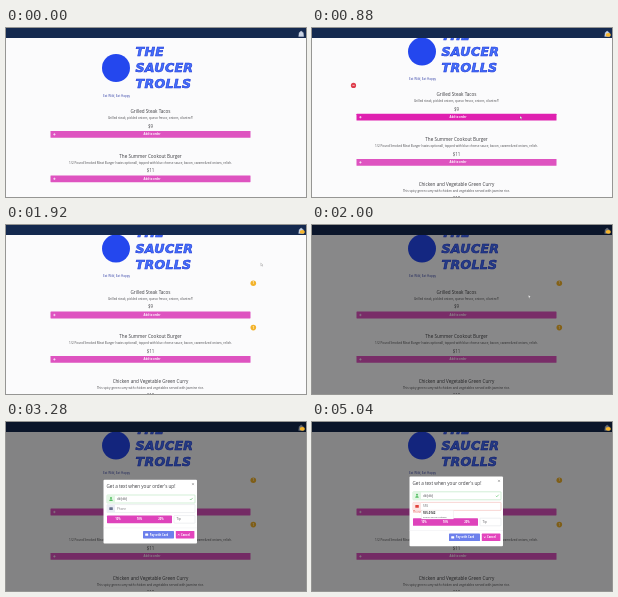
An HTML page for the animation above (5120 ms loop, 300 by 169 pixels).

```html
<!DOCTYPE html>
<html lang="en">
<head>
<meta charset="utf-8">
<title>Order page</title>
<style>
html, body { margin: 0; width: 100%; height: 100%; overflow: hidden; background: #fbfbfc; }
svg { display: block; width: 100vw; height: 100vh; }
text { font-family: "Open Sans", "Noto Sans", sans-serif; font-size: 3.05px; fill: #4a4a4e; }
.mid { text-anchor: middle; }
.title { font-size: 4.6px; fill: #3c3c40; }
.price { font-size: 4.4px; }
.label { font-size: 2.7px; font-weight: 700; fill: #fff; }
.word { font-family: "DejaVu Sans", sans-serif; font-size: 12.6px; font-weight: 700; font-style: italic;
  letter-spacing: .3px; fill: #4470fb; stroke: #1c34d6; stroke-width: .6px; }
.field { fill: #fff; stroke-width: .4px; }
.in { font-size: 3px; fill: #55555a; }
</style>
</head>
<body>
<svg viewBox="0 0 300 169" preserveAspectRatio="none">
  <rect width="300" height="169" fill="#fbfbfc"/>
  <g id="page">
    <circle cx="110" cy="40" r="14" fill="#2447ee"/>
    <text class="word" x="129.5" y="28">THE</text>
    <text class="word" x="129.5" y="44.3">SAUCER</text>
    <text class="word" x="129.5" y="60">TROLLS</text>
    <text x="97" y="68.6" style="font-size:3px;fill:#3442a8">Eat Wild, Eat Happy</text>
    <g id="menu"></g>
  </g>
  <rect width="300" height="10" fill="#14294f"/>
  <path d="M293.2 4.6h4l.5 3.8h-5zM294 4.6a1.2 1.4 0 0 1 2.4 0" fill="#c9d2e4" stroke="#c9d2e4" stroke-width=".4"/>
  <rect id="dim" width="300" height="169"/>
  <ellipse id="cart" cx="296.3" cy="6.9" rx="2.6" ry="1.8" fill="#f6b52c"/>
  <g id="modal">
    <rect id="sheet" x="97.5" width="93.5" rx="1" fill="#fff"/>
    <text class="title" x="100.5" y="8.4">Get a text when your order's up!</text>
    <path d="M186 3.3l2 2m0-2l-2 2" stroke="#777" stroke-width=".5"/>
    <g transform="translate(0 15.2)">
      <rect id="nameBox" class="field" x="101" y="0" width="88" height="8" rx=".6"/>
      <rect id="nameSide" x="101.2" y=".2" width="7.8" height="7.6"/>
      <g id="nameIcon"><circle cx="105" cy="3" r="1"/><path d="M103.2 6a1.8 1.8 0 0 1 3.6 0z"/></g>
      <text id="name" class="in" x="111" y="5.1"></text>
      <path id="check" d="M183.8 4l1 1 1.9-2.1" fill="none" stroke="#54bf62" stroke-width=".6"/>
      <rect id="nameCaret" y="2" width=".3" height="4" fill="#333"/>
    </g>
    <g id="phoneRow">
      <rect id="phoneBox" class="field" x="101" y="0" width="88" height="8" rx=".6"/>
      <rect id="phoneSide" x="101.2" y=".2" width="7.8" height="7.6"/>
      <rect id="phoneIcon" x="103.3" y="2.7" width="3.5" height="2.7" rx=".5"/>
      <rect id="mark" y="1.8" height="4.4" fill="#a9c8f7"/>
      <text id="phone" class="in" x="111" y="5.1"></text>
      <rect id="phoneCaret" y="2" width=".3" height="4" fill="#333"/>
      <text id="error" x="101" y="10.9" style="font-size:2.7px;fill:#e2433c">Phone number is not valid</text>
    </g>
    <g id="foot">
      <rect x="101" y="0" width="65" height="7.6" rx=".6" fill="#de43bb"/>
      <text class="label mid" x="112" y="4.8">10%</text>
      <text class="label mid" x="133.5" y="4.8">18%</text>
      <text class="label mid" x="155" y="4.8">20%</text>
      <rect class="field" x="168" y="0" width="21" height="7.6" rx=".6" stroke="#d5d8df"/>
      <text class="in" x="170.5" y="4.9">Tip</text>
      <path d="M97.5 12.3h93.5" stroke="#e8e8ee" stroke-width=".4"/>
      <rect x="137" y="15.4" width="31" height="7.4" rx=".6" fill="#6d80ec"/>
      <rect x="139.2" y="18" width="3" height="2.2" rx=".3" fill="#fff"/>
      <text class="label" x="143.8" y="20.1">Pay with Card</text>
      <rect x="169.8" y="15.4" width="18.6" height="7.4" rx=".6" fill="#e344bd"/>
      <path d="M172 18.3l1.5 1.5m0-1.5l-1.5 1.5" stroke="#fff" stroke-width=".5"/>
      <text class="label" x="175" y="20.1">Cancel</text>
    </g>
    <g id="wordList">
      <rect x="109.5" y="33" width="76.5" height="6.8" fill="#add0f4"/>
      <text class="in" x="111" y="37.3" style="fill:#26344a">dkfjdkfjdkfj</text>
    </g>
    <g id="numberList">
      <rect x="109.5" y="33.6" width="32" height="8.8" fill="#fff" stroke="#ddd" stroke-width=".3"/>
      <text x="111" y="37.3" style="font-size:2.85px;font-weight:700;fill:#333">555-0142</text>
      <text x="111" y="41.3" style="font-size:2.3px">Phone and fill settings</text>
    </g>
  </g>
  <path id="cursor" d="M0 0v2.8l.7-.6.6 1.2.5-.3-.5-1.1h.9z" fill="#fff" stroke="#666" stroke-width=".25"/>
</svg>
<script>
const LOOP = 5120, STEP = 80;
const NAME = "dkfjdkfj";
const $ = id => document.getElementById(id);
const set = (id, attrs) => {
  for (const k in attrs) $(id).setAttribute(k, attrs[k]);
};
const show = (id, on) => set(id, { visibility: on ? "inherit" : "hidden" });
const move = (id, x, y) => set(id, { transform: `translate(${x} ${y})` });

// Tables of [time, value]: hold keeps the last value, glide eases between them.
function hold(table, t) {
  let value = table[0][1];
  for (const [at, v] of table) if (t >= at) value = v;
  return value;
}
function glide(table, t) {
  const i = table.findIndex(row => row[0] > t);
  if (i === 0) return table[0].slice(1);
  if (i < 0) return table[table.length - 1].slice(1);
  const a = table[i - 1], b = table[i];
  const p = (t - a[0]) / (b[0] - a[0]), e = p * p * (3 - 2 * p);
  return a.slice(1).map((v, k) => v + (b[k + 1] - v) * e);
}

const dishes = [
  ["Grilled Steak Tacos", "Grilled steak, pickled onions, queso fresco, onions, cilantro!!!", "$9"],
  ["The Summer Cookout Burger", "1/2 Pound Smoked Meat Burger (swiss optional), topped with blue cheese sauce, bacon, caramelized onions, relish.", "$11"],
  ["Chicken and Vegetable Green Curry", "This spicy green curry with chicken and vegetables served with jasmine rice.", "$10"]
];
$("menu").innerHTML = dishes.map(([title, about, price], i) => `
  <g id="dish${i}">
    <text class="title mid" x="144.5" y="1.7">${title}</text>
    <text class="mid" x="144.5" y="7.7">${about}</text>
    <text class="price mid" x="144.5" y="16.2">${price}</text>
    <rect id="add${i}" x="44.5" y="19.4" width="200" height="6.8" rx=".4"/>
    <path d="M47.2 22.8h2.4m-1.2-1.2v2.4" stroke="#fff" stroke-width=".6"/>
    <text class="label mid" x="146" y="23.8">Add to order</text>
    <g id="less${i}"><circle cx="41.5" cy="-9" r="2.6" fill="#de3d4c"/>
      <path d="M40.4 -9h2.2" stroke="#fff" stroke-width=".6"/></g>
    <g id="count${i}"><circle cx="247.3" cy="-9" r="2.8" fill="#f3b32b"/>
      <text class="label mid" x="247.3" y="-8">1</text></g>
  </g>`).join("");

const scroll = [[0, 0], [560, 0], [720, -16.4]];
const hovered = [[0, -1], [720, 0], [1040, -1], [1120, 1], [1440, -1]];
const lifts = [
  [[0, 0], [720, 0], [1040, -1.6], [1200, 0]],
  [[0, 0], [1040, 0], [1200, -1.6], [1360, -1.6], [1520, 0]],
  [[0, 0]]
];
const added = [960, 1280, Infinity];
const pointer = [
  [80, 200, 78], [240, 207, 91], [640, 207, 91], [720, 208, 88], [960, 208, 88],
  [1120, 217, 133], [1280, 217, 133], [1360, 216.5, 92.5], [1680, 293, 6],
  [1840, 293, 6], [2000, 216.5, 70], [2320, 130, 76]
];
const nameLength = [[0, 0], [2800, 1], [3040, 4], [3200, 6], [3280, 8]];
const phoneText = [
  [0, ""], [3520, "d"], [3600, "dk"], [3680, "dkfj"], [3760, "dkfjd"], [3920, "dkfjdk"],
  [4000, "dkfjdkf"], [4080, NAME], [4480, ""], [4640, "5"], [4720, "55"], [4800, "555"]
];

function drawPage(t) {
  move("page", 0, glide(scroll, t)[0]);
  const over = hold(hovered, t);
  dishes.forEach((_, i) => {
    move("dish" + i, 0, 83.6 + i * 44.4 + glide(lifts[i], t)[0]);
    set("add" + i, { fill: over === i ? "#df20b0" : "#de53c0" });
    show("less" + i, over === i && t >= added[i] - 80);
    show("count" + i, t >= added[i]);
  });
  show("cart", t >= 880);
  set("dim", { opacity: hold([[0, 0], [2000, .46], [2080, .48]], t) });
}

function drawModal(t) {
  const open = t >= 2080;
  show("modal", open);
  if (!open) return;
  const bad = t >= 3520, grow = bad ? 5.8 : 0;
  const [slide, fade] = glide([[2000, -26, 0], [2320, 0, 1]], t);
  move("modal", 0, (bad ? 54.6 : 57.8) + slide);
  set("modal", { opacity: fade });
  set("sheet", { height: 63.8 + grow });
  move("phoneRow", 0, bad ? 25.8 : 24.8);
  move("foot", 0, 35.8 + grow);

  const good = t >= 2800;
  set("nameBox", { stroke: good ? "#8fd79a" : "#d5d8df" });
  set("nameSide", { fill: good ? "#e2f6e4" : "#eceef3" });
  set("nameIcon", { fill: good ? "#54bf62" : "#76809a" });
  show("check", good);
  const typed = NAME.slice(0, hold(nameLength, t));
  $("name").textContent = typed || "Name";
  set("name", { opacity: typed ? 1 : .6 });
  set("nameCaret", { x: 111.2 + (typed ? $("name").getComputedTextLength() : 0) });
  show("nameCaret", t >= 2800 && t < 3280);

  set("phoneBox", { stroke: bad ? "#ee9a96" : "#d5d8df" });
  set("phoneSide", { fill: bad ? "#fde5e4" : "#e9ecf4" });
  set("phoneIcon", { fill: bad ? "#e2433c" : "#67718f" });
  show("error", bad);
  const number = hold(phoneText, t);
  const picks = t >= 4080 && t < 4480;
  const label = $("phone");
  label.textContent = number || "Phone";
  set("phone", { opacity: number ? 1 : .75 });
  const end = 111 + (number ? label.getComputedTextLength() : 0);
  if (picks) {
    label.textContent = number + "dkfj";
    set("mark", { x: end, width: 111 + label.getComputedTextLength() - end });
  }
  show("mark", picks);
  set("phoneCaret", { x: end + .2 });
  show("phoneCaret", bad && !picks && t < 5040);
  show("wordList", t >= 3920 && t < 4480);
  show("numberList", t >= 4640);
}

function draw(now) {
  const t = Math.floor((now % LOOP) / STEP) * STEP;
  drawPage(t);
  drawModal(t);
  move("cursor", ...glide(pointer, t));
  show("cursor", t >= 80 && t < 2800);
}

const start = performance.now();
function tick() {
  draw(performance.now() - start);
  requestAnimationFrame(tick);
}
tick();
</script>
</body>
</html>
```
